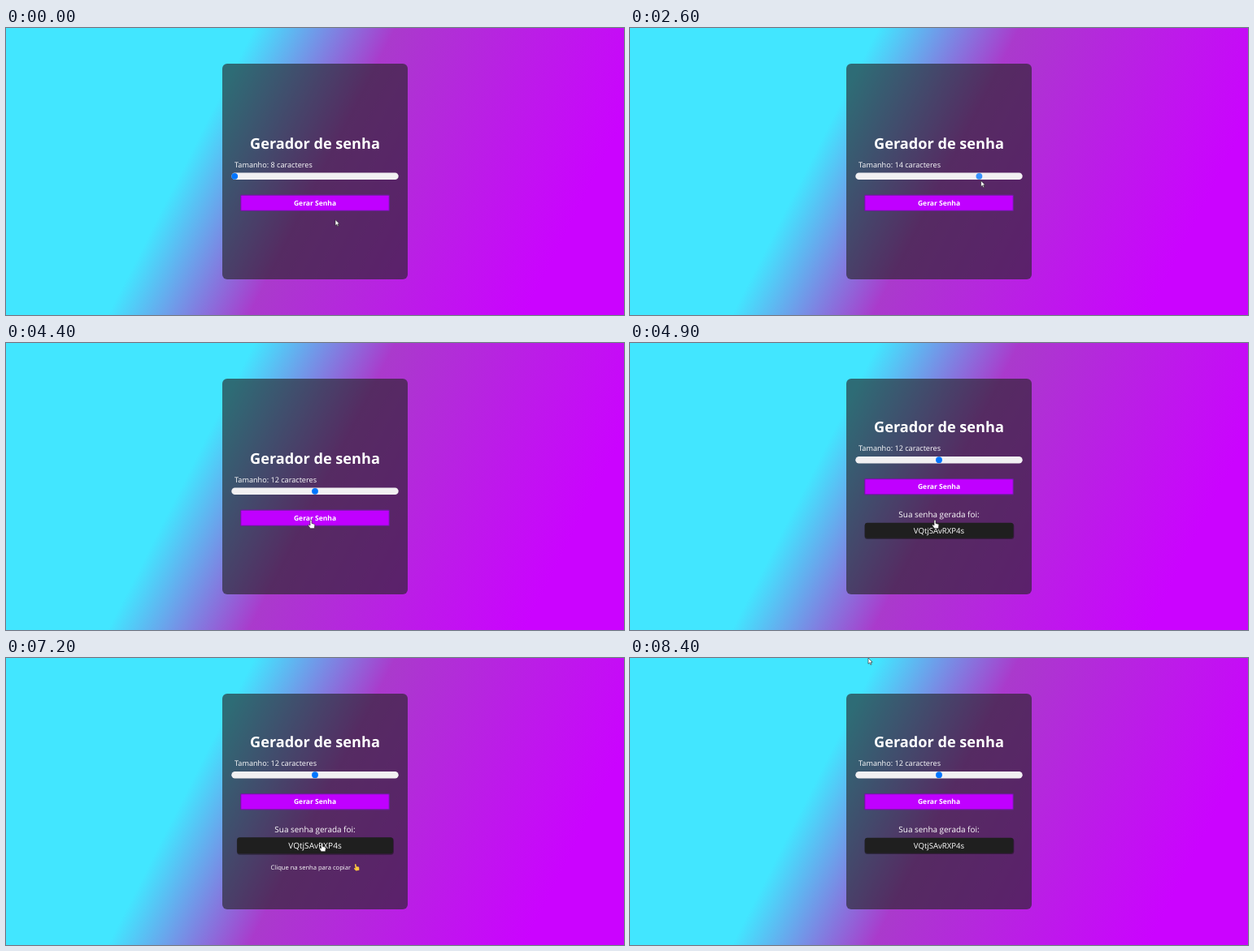
Recreate the animation shown at these times as an HTML page. Size 760 by 354 pixels, loop 8.5 s.

```html
<!DOCTYPE html>
<html lang="pt">
<head>
<meta charset="utf-8">
<title>Gerador de senha</title>
<style>
  html, body { margin: 0; width: 100%; height: 100%; overflow: hidden; }
  svg { display: block; width: 760px; height: 354px; }
  text { font-family: "Open Sans", "Noto Sans", sans-serif; fill: #fff; text-rendering: geometricPrecision; }
  .mid { text-anchor: middle; }
  .bold { font-weight: 700; }
</style>
</head>
<body>
<svg viewBox="0 0 760 354">
  <defs>
    <linearGradient id="sky" gradientUnits="userSpaceOnUse" x1="6.7" y1="-13.2" x2="753.3" y2="367.2">
      <stop offset=".325" stop-color="#42e6ff"/>
      <stop offset=".51" stop-color="#aa3acc"/>
      <stop offset=".87" stop-color="#cb03ff"/>
    </linearGradient>
    <path id="handShape" d="M-1 .8a1 1 0 0 1 2 0V4l3 .8q1 .4 .8 1.6l-.6 3.8h-5L-3 7q-.8-1.4 .6-1.4L-1 6.5Z"/>
  </defs>
  <rect width="760" height="354" fill="url(#sky)"/>
  <rect x="266" y="44" width="228" height="266" rx="6" fill="#222" fill-opacity=".62"/>

  <g id="form">
    <text class="mid bold" x="380" y="149" font-size="18.15" fill="#f8f4fa">Gerador de senha</text>
    <text id="label" x="281" y="172" font-size="9.13"></text>
    <rect x="277.3" y="178.5" width="205.4" height="8.6" rx="4.3" fill="#f1f0f2"/>
    <circle id="thumb" cy="182.8" r="3.9"/>
    <rect x="288" y="205.6" width="184" height="20.4" rx="1.5" fill="#6d1c9c"/>
    <rect x="289.3" y="206.8" width="181.4" height="18" rx=".5" fill="#c000ff"/>
    <text class="mid bold" x="380" y="218.8" font-size="8.5">Gerar Senha</text>
  </g>

  <g id="result">
    <text class="mid" x="380" y="215" font-size="9.93">Sua senha gerada foi:</text>
    <g id="box">
      <rect x="288.5" y="222.3" width="183.8" height="19.8" rx="3.5" fill="#161018" opacity=".5"/>
      <rect x="288.8" y="221.8" width="182.6" height="19" rx="3" fill="#1f1f1f"/>
      <text class="mid" x="380" y="234.8" font-size="9.6">VQtjSAvRXP4s</text>
    </g>
    <g id="hint">
      <text x="325.5" y="261.4" font-size="7.6">Clique na senha para copiar</text>
      <use href="#handShape" transform="translate(429.6 254.3) rotate(-10) scale(.8)" fill="#ffc83d"/>
    </g>
  </g>

  <g id="cursor" fill="#fff" stroke="#222" stroke-width=".6" stroke-linejoin="round">
    <path id="arrow" d="M0 0V7.2L1.7 5.7 2.9 8.3 4.1 7.8 2.9 5.2H5.2Z"/>
    <use id="hand" href="#handShape"/>
  </g>
</svg>
<script>
  const LOOP = 8500, STEP = 100, CLICK = 4900, LIFT = -38.6;
  const MIN = 8, MAX = 16, LEFT = 281.2, RIGHT = 478.8;

  // time, x, y of the pointer tip
  const PATH = [
    [0, 405, 236.5], [200, 421, 226], [400, 391, 207], [600, 391, 207],
    [1400, 293, 186], [1700, 282, 184], [1800, 282, 184], [3000, 484, 190],
    [3600, 377, 185], [3700, 377, 185], [3800, 377, 186], [3900, 377, 186],
    [4400, 375, 218.5], [4900, 375, 218.5], [5800, 396.5, 225.5],
    [6200, 388.5, 228.5], [7200, 388.5, 228.5], [8400, 293, 0]
  ];

  const $ = id => document.getElementById(id);
  const set = (id, name, value) => $(id).setAttribute(name, value);
  const clamp = (v, a, b) => Math.min(b, Math.max(a, v));
  const smooth = k => k * k * (3 - 2 * k);
  const ramp = (t, a, b) => smooth(clamp((t - a) / (b - a), 0, 1));
  const show = (id, on) => set(id, "visibility", on ? "visible" : "hidden");

  function pointer(t) {
    const i = PATH.findIndex(p => p[0] > t);
    if (i < 0) return PATH[PATH.length - 1].slice(1);
    const [t0, x0, y0] = PATH[i - 1], [t1, x1, y1] = PATH[i];
    const k = ramp(t, t0, t1);
    return [x0 + (x1 - x0) * k, y0 + (y1 - y0) * k];
  }

  function sliderValue(t, x) {
    if (t < 1800) return MIN;
    if (t >= 3600) return 12;
    const k = (x - LEFT) / (RIGHT - LEFT);
    return clamp(Math.round(MIN + k * (MAX - MIN)), MIN, MAX);
  }

  function draw(t) {
    const [x, y] = pointer(t);
    const done = t >= CLICK;
    const value = sliderValue(t, x);
    const lift = done ? LIFT : 0;

    set("form", "transform", `translate(0 ${lift})`);
    $("label").textContent = `Tamanho: ${value} caracteres`;
    set("thumb", "cx", LEFT + (value - MIN) / (MAX - MIN) * (RIGHT - LEFT));
    set("thumb", "fill", t >= 1700 && t < 3900 ? "#3793ff" : "#0075ff");

    show("result", done);
    const grow = 1 + .05 * (ramp(t, 5300, 5950) - ramp(t, 7300, 7700));
    set("box", "transform", `translate(380 231.3) scale(${grow}) translate(-380 -231.3)`);
    set("hint", "opacity", ramp(t, 5200, 5700) - ramp(t, 7700, 8200));

    const top = 206 + lift;
    const onButton = x > 288 && x < 472 && y > top && y < top + 20;
    const onBox = done && y > 217 && y < 242;
    const pointing = onButton || onBox;
    set("cursor", "transform", `translate(${x} ${y})`);
    show("hand", pointing);
    show("arrow", !pointing);
  }

  const start = performance.now();
  function tick() {
    const t = (performance.now() - start) % LOOP;
    draw(Math.floor((t + 1) / STEP) * STEP % LOOP);
    requestAnimationFrame(tick);
  }
  tick();
</script>
</body>
</html>
```
